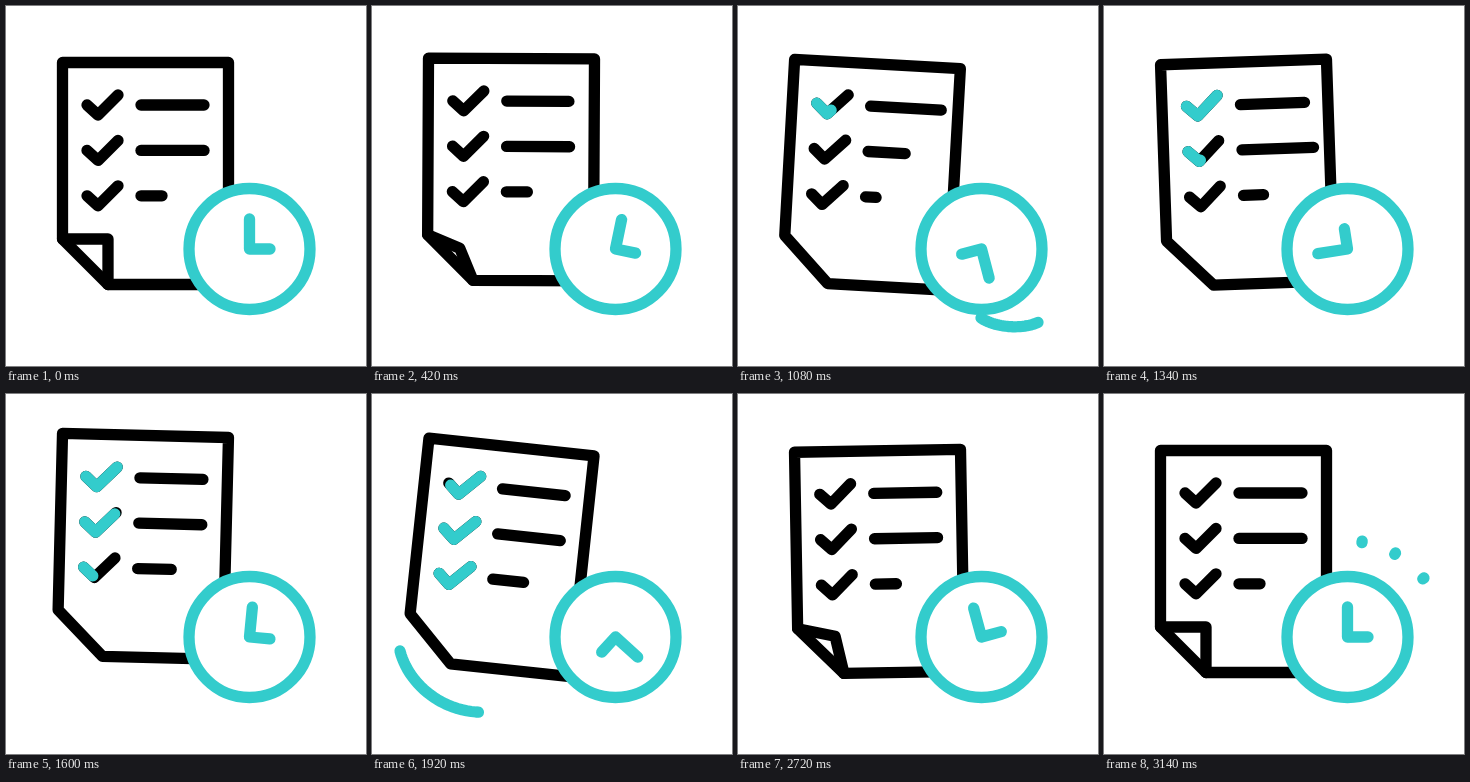
Recreate the animation shown at these times as an HTML page with a canvas. Size 360 by 360 pixels, loop 3.16 s.

```html
<!DOCTYPE html>
<html lang="en">
<head>
<meta charset="utf-8">
<title>Checklist and clock</title>
<style>
html, body { margin: 0; width: 100%; height: 100%; overflow: hidden; background: #fff; }
canvas { display: block; width: 100vmin; height: 100vmin; }
</style>
</head>
<body>
<canvas id="stage"></canvas>
<script>
const LOOP = 3160, SIZE = 360;
const INK = '#000', TEAL = '#33cccc';
const canvas = document.getElementById('stage');
const ctx = canvas.getContext('2d');

const clamp = v => Math.max(0, Math.min(1, v));
const mix = (a, b, u) => a + (b - a) * u;
const span = (t, a, b) => clamp((t - a) / (b - a));
const ease = (t, a, b) => (1 - Math.cos(Math.PI * span(t, a, b))) / 2;
const bump = (t, a, peak, b) => ease(t, a, peak) - ease(t, peak, b);

// The page hops twice, sinking slightly between hops, and sways as it goes.
const lift = t =>
  1.5 * bump(t, 200, 600, 2850) * (t < 2400) + 1.5 * (t >= 2400) * (1 - ease(t, 2400, 2850));

function pageLift(t) {
  const sink = 1.5 * (ease(t, 200, 600) - ease(t, 2400, 2850));
  return sink - 19 * (bump(t, 240, 780, 1080) + bump(t, 1240, 1710, 2030));
}

function pageTilt(t) {
  const sway = 6.8 * ease(t, 350, 900) - 8.8 * ease(t, 900, 1310)
    + 8.2 * ease(t, 1310, 1960) - 8.7 * ease(t, 1960, 2430) + 2.5 * ease(t, 2430, 2950);
  return sway * Math.PI / 180;
}

// A line shrinks, springs past its length, then settles.
function lineScale(t, { over, rise, settle }) {
  const low = 860, high = low + rise;
  return 1 - 0.53 * ease(t, 370, low) + (0.53 + over) * ease(t, low, high)
    - over * ease(t, high, high + settle);
}

function stroke(pts, color, closed) {
  ctx.beginPath();
  pts.forEach(p => ctx.lineTo(p[0], p[1]));
  if (closed) ctx.closePath();
  ctx.strokeStyle = color;
  ctx.stroke();
}

// Draws the part of a polyline between two fractions of its length.
function trim(pts, from, to, color) {
  if (to - from < 0.001) return;
  const seg = pts.slice(1).map((p, i) => Math.hypot(p[0] - pts[i][0], p[1] - pts[i][1]));
  const total = seg.reduce((a, b) => a + b, 0);
  const at = (i, d) => {
    const u = d / seg[i], a = pts[i], b = pts[i + 1];
    return [mix(a[0], b[0], u), mix(a[1], b[1], u)];
  };
  const lo = from * total, hi = to * total, out = [];
  let pos = 0;
  seg.forEach((len, i) => {
    const a = Math.max(lo, pos), b = Math.min(hi, pos + len);
    if (b > a) {
      if (!out.length) out.push(at(i, a - pos));
      out.push(at(i, b - pos));
    }
    pos += len;
  });
  stroke(out, color);
}

function bezier(a, b, c, d) {
  const out = [];
  for (let i = 0; i <= 24; i++) {
    const u = i / 24, w = 1 - u;
    out.push([0, 1].map(k =>
      w * w * w * a[k] + 3 * w * w * u * b[k] + 3 * w * u * u * c[k] + u * u * u * d[k]));
  }
  return out;
}

const rightSwoosh = [
  ...bezier([348, 233], [349, 272], [327, 307], [296, 318]),
  ...bezier([296, 318], [278, 323.5], [256, 320.5], [243, 312]).slice(1)
];
const leftSwoosh = [
  ...bezier([28, 257], [36, 288], [66, 315], [104, 318]),
  ...bezier([104, 318], [122, 319.5], [140, 317], [155, 313]).slice(1)
];

const quick = { over: 0.16, rise: 260, settle: 280 };
const slow = { over: 0.6, rise: 400, settle: 1200 };
const rows = [
  { len: 63, spring: quick },
  { len: 63, spring: quick },
  { len: 21, spring: slow }
];

function drawRow({ len, spring }, i, t) {
  const y = 99 + 45.4 * i;
  const fill = 870 + 300 * i, clear = 1900 + 180 * i;
  const tick = [[81, y], [92, y + 10], [112, y - 10]];
  stroke(tick, INK);
  trim(tick, span(t, clear, clear + 320), span(t, fill, fill + 450), TEAL);
  stroke([[135, y], [135 + len * lineScale(t - 150 * i, spring), y]], INK);
}

function drawPage(t) {
  ctx.save();
  ctx.translate(139.5, 56.5 + pageLift(t));
  ctx.rotate(pageTilt(t));
  ctx.translate(-139.5, -56.5);
  stroke([[56.5, 56.5], [222.5, 56.5], [222.5, 278.5], [102, 278.5], [56.5, 233]], INK, true);
  const open = 1 - ease(t, 200, 600) + ease(t, 2460, 2900);
  if (open > 0.01) {
    const corner = [mix(79, 102, open), mix(256, 233, open)];
    stroke([[56.5, 233], corner, [102, 278.5]], INK);
  }
  rows.forEach((row, i) => drawRow(row, i, t));
  ctx.restore();
}

function drawClock(t) {
  ctx.save();
  ctx.translate(243.5, 243);
  ctx.beginPath();
  ctx.arc(0, 0, 60.5, 0, Math.PI * 2);
  ctx.fillStyle = '#fff';
  ctx.fill();
  ctx.strokeStyle = TEAL;
  ctx.stroke();
  ctx.rotate(ease(t, 195, 2980) * Math.PI * 4);
  stroke([[0, -30], [0, 0], [20.5, 0]], TEAL);
  ctx.restore();
}

function drawSwoosh(path, t) {
  trim(path, ease(t, 800, 1280), ease(t, 520, 820), TEAL);
}

function drawSparks(t) {
  if (t < 2790) return;
  const outer = mix(78, 97, ease(t, 2780, 3040));
  const inner = mix(78, 95.5, ease(t, 2910, 3140));
  for (const deg of [9, 30, 52.5]) {
    const a = deg * Math.PI / 180;
    const at = r => [243 + r * Math.sin(a), 243 - r * Math.cos(a)];
    stroke([at(inner), at(outer)], TEAL);
  }
}

function draw(t) {
  const px = Math.round(Math.min(innerWidth, innerHeight) * (window.devicePixelRatio || 1)) || SIZE;
  if (canvas.width !== px) canvas.width = canvas.height = px;
  ctx.setTransform(px / SIZE, 0, 0, px / SIZE, 0, 0);
  ctx.fillStyle = '#fff';
  ctx.fillRect(0, 0, SIZE, SIZE);
  ctx.lineWidth = 11.3;
  ctx.lineCap = ctx.lineJoin = 'round';
  drawPage(t);
  drawClock(t);
  drawSwoosh(rightSwoosh, t);
  drawSwoosh(leftSwoosh, t - 1215);
  drawSparks(t);
}

const start = performance.now();
function tick() {
  draw((performance.now() - start) % LOOP);
  requestAnimationFrame(tick);
}
tick();
</script>
</body>
</html>
```
